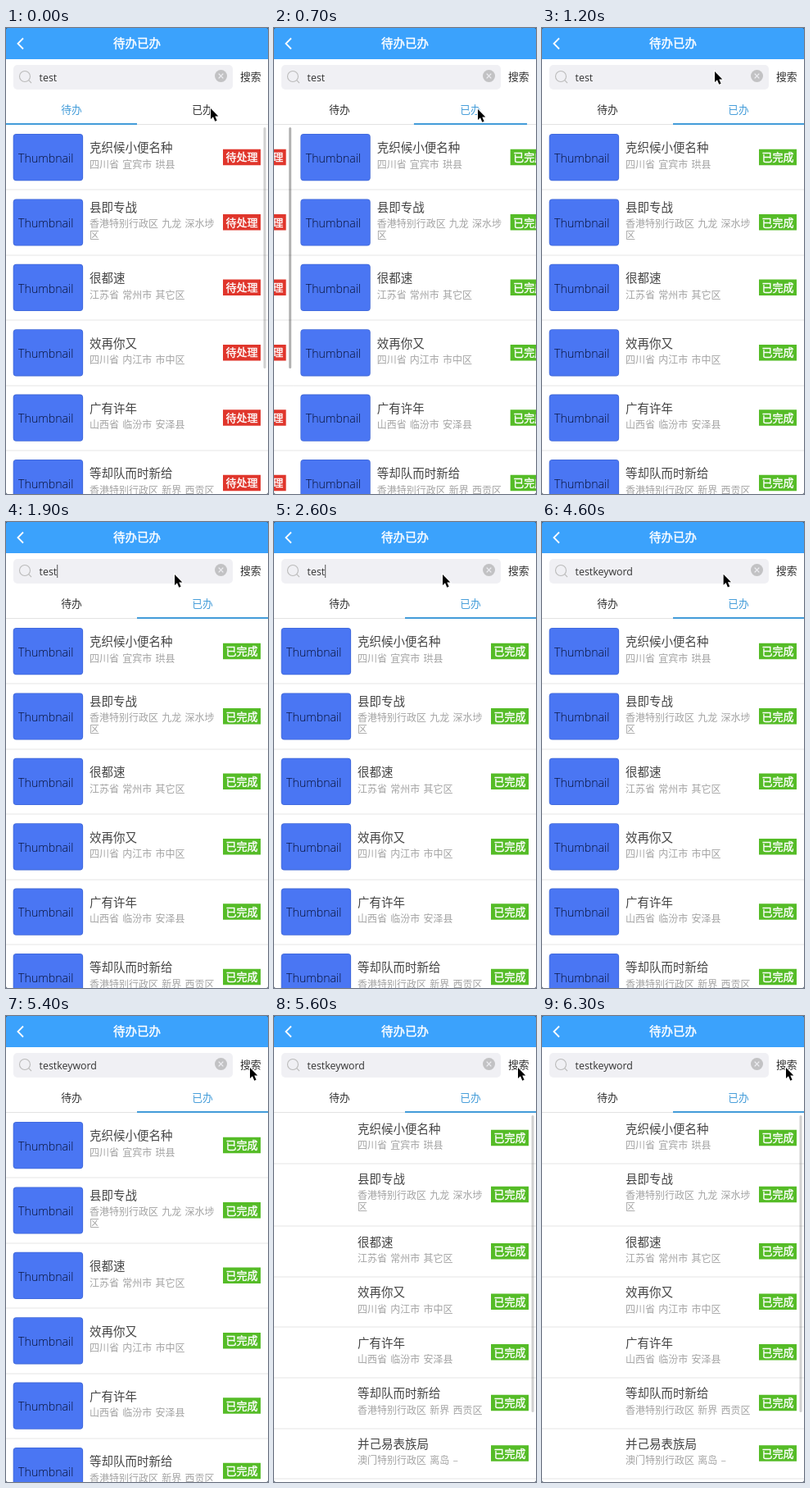
An HTML page with a canvas for the animation above (6.4 s loop, 320x568 px).

```html
<!DOCTYPE html>
<html lang="zh-CN">
<head>
<meta charset="utf-8">
<title>待办已办</title>
<style>
html, body { margin: 0; width: 100%; height: 100%; overflow: hidden; background: #345; }
canvas { display: block; width: 320px; height: 568px; border-radius: 2px; }
</style>
</head>
<body>
<canvas></canvas>
<script>
const canvas = document.querySelector('canvas');
const ctx = canvas.getContext('2d');
const ratio = window.devicePixelRatio || 1;
canvas.width = 320 * ratio;
canvas.height = 568 * ratio;

const LOOP = 6400, STEP = 100;
const SWITCH = 493, SLIDE = 300, RELOAD = 5500;
const BLUE = '#3ba2fc', ACCENT = '#439cd9', INK = '#333', FIELD = '#f0f0f4';
const CJK = '"Noto Sans CJK SC", "Noto Sans CJK", sans-serif';
const LATIN = '"Open Sans", "Noto Sans", sans-serif';

const rows = [
  ['克织候小便名种', '四川省 宜宾市 珙县'],
  ['县即专战', '香港特别行政区 九龙 深水埗', '区'],
  ['很都速', '江苏省 常州市 其它区'],
  ['效再你又', '四川省 内江市 市中区'],
  ['广有许年', '山西省 临汾市 安泽县'],
  ['等却队而时新给', '香港特别行政区 新界 西贡区'],
  ['并己易表族局', '澳门特别行政区 离岛 –'],
];
const pending = { label: '待处理', color: '#e0362c' };
const done = { label: '已完成', color: '#55bc27' };

// Pointer stops: time, x, y
const pointerPath = [
  [0, 250, 98], [700, 249, 99], [800, 249, 99], [1200, 211, 53], [1500, 206, 64],
  [4500, 206, 64], [4900, 306, 62], [5100, 298, 63], [LOOP, 298, 63],
];
const keyTimes = [2900, 3200, 3500, 3700, 3900, 4100, 4300];

const clamp = v => Math.min(1, Math.max(0, v));
const smooth = p => p * p * (3 - 2 * p);

// cubic-bezier(.35, 0, .25, 1)
function slideEase(x) {
  let lo = 0, hi = 1;
  for (let i = 0; i < 20; i++) {
    const s = (lo + hi) / 2, r = 1 - s;
    if (1.05 * r * r * s + 0.75 * r * s * s + s ** 3 < x) lo = s; else hi = s;
  }
  return smooth(lo);
}

function rect(x, y, w, h, color, radius = 0) {
  ctx.fillStyle = color;
  ctx.beginPath();
  ctx.roundRect(x, y, w, h, radius);
  ctx.fill();
}

function circle(x, y, r) {
  ctx.beginPath();
  ctx.arc(x, y, r, 0, Math.PI * 2);
}

function line(color, width, ...points) {
  ctx.strokeStyle = color;
  ctx.lineWidth = width;
  ctx.beginPath();
  points.forEach(([x, y]) => ctx.lineTo(x, y));
  ctx.stroke();
}

// Places text by its vertical centre; medium adds a thin outline for a half-bold look
function text(str, x, y, size, color, { align = 'left', weight = 400, family = CJK, spacing = 0, medium = false } = {}) {
  ctx.font = `${weight} ${size}px ${family}`;
  ctx.textAlign = align;
  ctx.wordSpacing = spacing + 'px';
  ctx.fillStyle = ctx.strokeStyle = color;
  ctx.fillText(str, x, y + size * 0.38);
  if (!medium) return;
  ctx.lineWidth = 0.4;
  ctx.strokeText(str, x, y + size * 0.38);
}

function drawList(x, status, thumbs) {
  let top = 118;
  for (const [title, ...lines] of rows) {
    const two = lines.length > 1;
    const height = thumbs ? 79.4 : two ? 76.5 : 61.6;
    const mid = top + height / 2;
    if (thumbs) {
      rect(x + 8.7, mid - 28.7, 85.4, 57.2, '#4068d6', 4);
      rect(x + 9.5, mid - 27.9, 83.8, 55.6, '#4a76f3', 3.2);
      text('Thumbnail', x + 48.8, mid + 0.8, 14.2, '#081136', { align: 'center', weight: 300, family: LATIN });
    }
    text(title, x + 102, mid - (two ? 19 : 11.8), 14.5, '#444');
    lines.forEach((str, i) =>
      text(str, x + 102, mid + (two ? 1 + 14 * i : 8.5), 12, '#a3a3a3', { spacing: 1.5 }));
    rect(x + 265, mid - 10, 46, 19.5, status.color);
    text(status.label, x + 288, mid - 0.4, 13, '#fff', { align: 'center', medium: true });
    top += height;
    rect(x, Math.round(top) - 0.5, 320, 1, '#e6e6e6');
  }
}

function drawHeader() {
  rect(0, 0, 320, 118, '#fff');
  rect(0, 0, 320, 38, BLUE);
  line('#fff', 1.8, [21, 12.5], [14.5, 19], [21, 25.5]);
  text('待办已办', 160, 18.6, 14.5, '#fff', { align: 'center', medium: true });
}

function drawSearch(t) {
  rect(9, 45, 268, 30, FIELD, 5);
  circle(23, 59, 6.5);
  ctx.strokeStyle = '#bbb';
  ctx.lineWidth = 1.1;
  ctx.stroke();
  line('#bbb', 1.1, [27.7, 63.7], [31, 67]);

  const typed = 'testkeyword'.slice(0, 4 + keyTimes.filter(k => t >= k).length);
  text(typed, 40.6, 60.3, 12.4, INK, { family: LATIN });
  const blinkOn = t < 2100 || (t >= 2600 && t < 4500) || t >= 5000;
  if (t >= 1600 && t < 5100 && blinkOn) rect(40.6 + ctx.measureText(typed).width, 52, 1, 16, '#555');

  circle(262.5, 58.5, 7.5);
  ctx.fillStyle = '#c2c2c4';
  ctx.fill();
  line(FIELD, 1.2, [259.7, 55.7], [265.3, 61.3]);
  line(FIELD, 1.2, [265.3, 55.7], [259.7, 61.3]);
  text('搜索', 286, 59.3, 12.8, INK);
}

function drawTabs(p) {
  const second = p > 0;
  text('待办', 80, 99.3, 12.8, second ? INK : ACCENT, { align: 'center' });
  text('已办', 240, 99.3, 12.8, second ? ACCENT : INK, { align: 'center' });
  rect(0, 117, 320, 1, '#e2e2e2');
  const width = second ? 160 * (1 - (1 - p) ** 1.7) : 160;
  rect((second ? 240 : 80) - width / 2, 116, width, 2, ACCENT);
}

function drawPointer(t) {
  if (t >= keyTimes[0] && t < 4600) return;
  const i = pointerPath.findIndex(stop => stop[0] > t);
  const [t0, x0, y0] = pointerPath[i - 1], [t1, x1, y1] = pointerPath[i];
  const k = smooth((t - t0) / (t1 - t0));
  ctx.save();
  ctx.translate(x0 + (x1 - x0) * k, y0 + (y1 - y0) * k);
  const arrow = new Path2D('M0 0V13L3 10.3L5.3 15.8L7.6 14.8L5.3 9.5H9.3Z');
  ctx.strokeStyle = '#fff';
  ctx.lineWidth = 1.8;
  ctx.stroke(arrow);
  ctx.fillStyle = '#000';
  ctx.fill(arrow);
  ctx.restore();
}

function draw(now) {
  const t = Math.floor((now % LOOP) / STEP) * STEP;
  const p = clamp((t - SWITCH) / SLIDE);
  const shift = 320 * slideEase(p);
  const reloaded = t >= RELOAD;

  ctx.setTransform(ratio, 0, 0, ratio, 0, 0);
  rect(0, 0, 320, 568, '#fff');
  if (p < 1) {
    drawList(-shift, pending, true);
    rect(314.5 - shift, 121, 3, 294, `rgba(0,0,0,${t < STEP ? 0.18 : 0.3})`, 1.5);
  }
  if (p > 0) drawList(320 - shift, done, !reloaded);
  if (reloaded) rect(314.5, 121, 3, 362, 'rgba(0,0,0,.18)', 1.5);
  drawHeader();
  drawSearch(t);
  drawTabs(p);
  drawPointer(t);
  requestAnimationFrame(draw);
}
requestAnimationFrame(draw);
</script>
</body>
</html>
```
